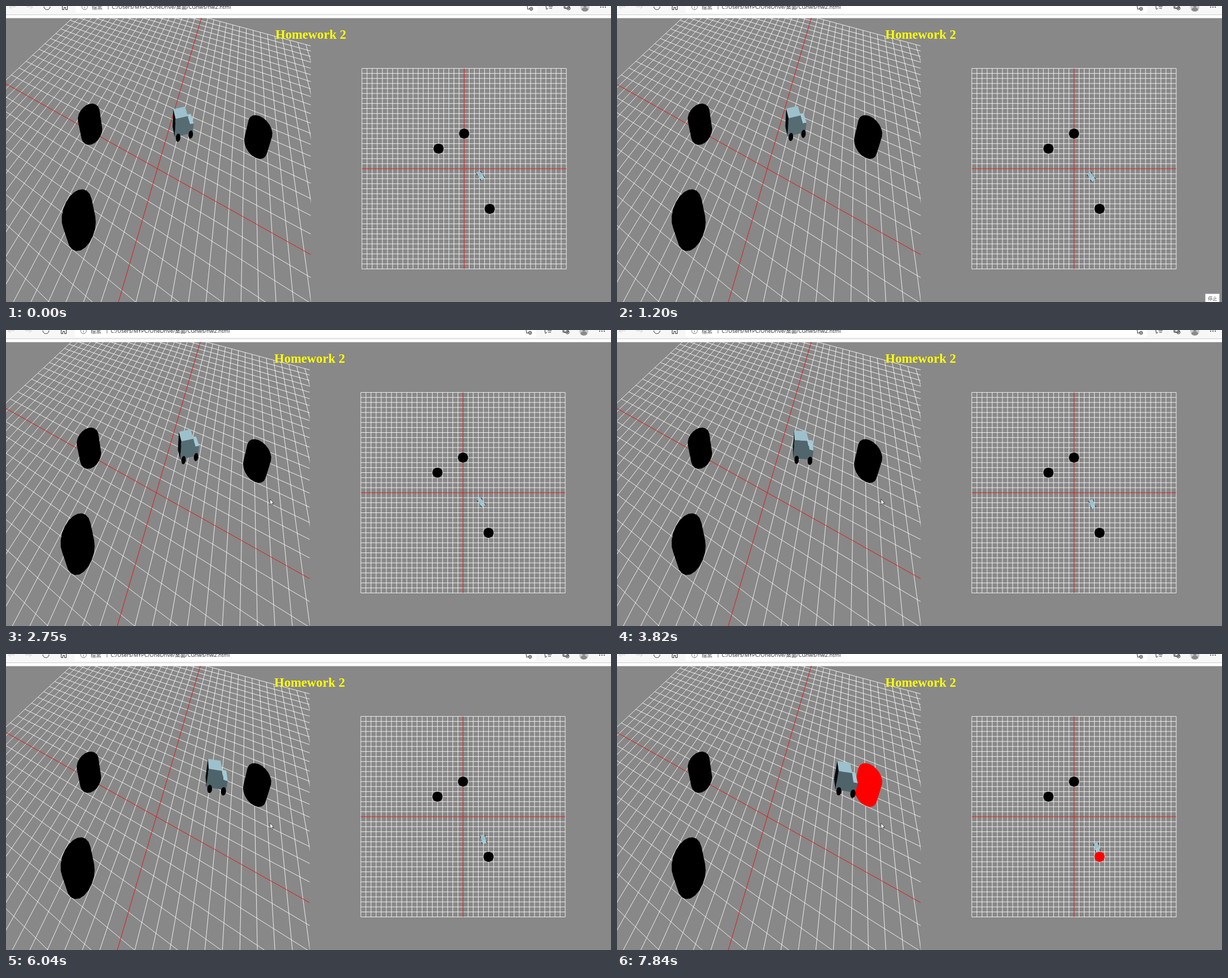
Recreate the animation shown at these times as an HTML page. Size 1069x524 px, loop 7910 ms.

```html
<!DOCTYPE html>
<html lang="zh-Hant">
<head>
<meta charset="utf-8">
<title>Homework 2</title>
<style>
html, body { margin: 0; width: 100%; height: 100%; overflow: hidden; background: #888; }
svg { display: block; width: 1069px; height: 524px; }
.ui { font-family: "Open Sans", "Noto Sans CJK TC", "Noto Sans CJK", sans-serif; }
.title { font: bold 22.6px "Liberation Serif", "Times New Roman", serif; fill: #ff0; text-anchor: middle; }
.icon { fill: none; stroke: #333; stroke-width: 1; }
.grid { fill: none; stroke: #fff; stroke-width: .85; }
.axis { fill: none; stroke: #e01818; stroke-width: 1; }
</style>
</head>
<body>
<svg viewBox="0 0 1069 524">
  <defs>
    <clipPath id="leftView"><rect x="-10" y="21" width="546.5" height="510"/></clipPath>
  </defs>
  <rect width="1069" height="524" fill="#888"/>
  <rect width="1069" height="21.5" fill="#fff"/>
  <rect width="1069" height="15" fill="#f7f7f7"/>
  <rect y="15" width="1069" height="1" fill="#ccc"/>
  <g id="scene">
    <g class="ui">
      <rect x="121" y="-12" width="816" height="24" rx="3" fill="#fff"/>
      <path class="icon" style="stroke:#ccc" d="M4 1.5h11M4 1.5l4 4M34 1.5h11M45 1.5l-4 4"/>
      <path class="icon" d="M65 1a5.5 5.5 0 1 0 11 0M97.500-3v9.500h3V2.500h3v4h3V-3"/>
      <circle class="icon" cx="137" cy="1.500" r="5" style="stroke:#777"/>
      <path class="icon" style="stroke:#777" d="M137 1v3.500M178.500-2v8"/>
      <text x="149.500" y="5.500" font-size="9.500" fill="#666">檔案</text>
      <text x="185" y="5.300" font-size="9.400" fill="#222">C:/Users/MYPC/OneDrive/桌面/CGhws/hw2.html</text>
      <path class="icon" d="M919 0l1 6 4-2M952 0l1 6 3-2M957 1h7M958 4h5M984-1v5h4M986-2h7v6h-7z"/>
      <circle class="icon" cx="926" cy="5" r="2.800"/>
      <circle class="icon" cx="992" cy="4" r="3" fill="#fff"/>
      <path class="icon" d="M924.500 5h3M926 3.500v3M990.500 4h3M992 2.500v3"/>
      <circle cx="1021" cy="2" r="8" fill="#c9c9c9"/>
      <path d="M1015 7a6 4.500 0 0 1 12 0a8 8 0 0 1-12 0" fill="#8a8a8a"/>
      <circle cx="1021" cy="0" r="2.600" fill="#8a8a8a"/>
      <path d="M1048 2h2M1052 2h2M1056 2h2" stroke="#333" stroke-width="1.600"/>
    </g>
    <g clip-path="url(#leftView)">
      <path id="floor" class="grid"/>
      <path id="floorAxis" class="axis"/>
      <g id="pillars"></g>
      <g id="truck"></g>
    </g>
    <path id="map" class="grid"/>
    <path id="mapAxis" class="axis"/>
    <g id="mapTruck"></g>
    <g id="mapPillars"></g>
    <text class="title" x="536.500" y="57.500">Homework 2</text>
    <g id="tooltip" class="ui">
      <rect x="1039.500" y="509.500" width="25" height="17" fill="#fff" stroke="#bbb"/>
      <text x="1044" y="521" font-size="8.200" fill="#555">停止</text>
    </g>
  </g>
  <path id="cursor" d="M466.500 299.500v9.500l2.200-2 1.500 3.300 1.500-.7-1.500-3.200h2.900z" fill="#fff" stroke="#222" stroke-width=".7"/>
  <circle id="busy" cx="473.500" cy="299.500" r="3.500" fill="none" stroke="#1b7fd0" stroke-width="2"/>
</svg>
<script>
const LOOP = 7910;
const HALF = 20;
const $ = id => document.getElementById(id);

// Camera orbiting the floor centre; the picture is squeezed to half width.
const cam = { dist: 14.4, focal: 581, squeeze: 0.5, sinP: 0.694, cosP: 0.72, sinA: 0.375, cosA: 0.927 };
const depthOf = ([x, y, z]) =>
  cam.dist + (cam.cosA * x - cam.sinA * z) * cam.cosP - y * cam.sinP;

function project(p) {
  const [x, y, z] = p;
  const side = cam.sinA * x + cam.cosA * z;
  const away = cam.cosA * x - cam.sinA * z;
  const k = cam.focal / depthOf(p);
  return [265.5 + side * k * cam.squeeze, 288 - (away * cam.sinP + y * cam.cosP) * k];
}
const topDown = ([x, , z]) => [807.5 + x * 9.03, 288 + z * 8.875];

const toPath = (pts, close = true) =>
  "M" + pts.map(p => p.map(v => v.toFixed(2)).join(" ")).join("L") + (close ? "Z" : "");

// Cut the part of a segment that lies behind the camera.
function floorLine(a, b) {
  const near = 0.5;
  const da = depthOf(a), db = depthOf(b);
  const cut = (p, q, dp, dq) => {
    if (dp >= near) return p;
    const k = (near - dp) / (dq - dp);
    return p.map((v, i) => v + (q[i] - v) * k);
  };
  if (da < near && db < near) return "";
  return toPath([project(cut(a, b, da, db)), project(cut(b, a, db, da))], false);
}
const mapLine = (a, b) => toPath([topDown(a), topDown(b)], false);

function lines(draw, axis) {
  let d = "";
  for (let i = -HALF; i <= HALF; i++) {
    if ((i === 0) !== axis) continue;
    d += draw([i, 0, -HALF], [i, 0, HALF]) + draw([-HALF, 0, i], [HALF, 0, i]);
  }
  return d;
}

const area = pts => pts.reduce((sum, p, i) => {
  const q = pts[(i + 1) % pts.length];
  return sum + p[0] * q[1] - q[0] * p[1];
}, 0);

function hull(points) {
  const pts = [...points].sort((a, b) => a[0] - b[0] || a[1] - b[1]);
  const chain = list => {
    const out = [];
    for (const p of list) {
      while (out.length > 1 && area([out[out.length - 2], out[out.length - 1], p]) <= 0) out.pop();
      out.push(p);
    }
    return out.slice(0, -1);
  };
  return [...chain(pts), ...chain(pts.reverse())];
}

const ring = (n, make) => Array.from({ length: n }, (_, i) => {
  const a = i / n * Math.PI * 2;
  return make(Math.cos(a), Math.sin(a));
});

const shape = (d, fill) => `<path d="${d}" fill="${fill}"/>`;

// Truck side profile as [forward, height], from rear bottom over the roof to front bottom.
const profile = [[-0.9, 0.25], [-0.9, 1.3], [0.25, 1.3], [0.52, 0.82], [0.9, 0.8], [0.9, 0.25]];
const faceFill = ["#080c0d", "#9dc1cc", "#a9d2df", "#a3cad6", "#a9d2df"];
const HALF_WIDTH = 0.4;
const wheel = { spots: [-0.58, 0.68], radius: 0.21, inner: 0.4, outer: 0.5 };

// Pose keys: [ms, x, z, heading in degrees].
const poses = [
  [0, 3.2, 1.35, 33], [670, 3.29, 1.48, 33], [1750, 3.43, 1.71, 33], [2750, 3.55, 1.9, 33],
  [4080, 3.57, 2.33, 15], [4750, 3.49, 2.76, 2], [4940, 3.51, 2.98, 4], [5760, 3.92, 4.16, 14],
  [6040, 4, 4.48, 14], [6580, 4.05, 4.69, 14], [7380, 4.16, 5.09, 14], [7840, 4.46, 6.08, 14]
];
function poseAt(t) {
  const i = poses.findIndex(p => p[0] > t);
  if (i < 0) return poses[poses.length - 1].slice(1);
  const a = poses[i - 1], b = poses[i];
  const k = (t - a[0]) / (b[0] - a[0]);
  return [1, 2, 3].map(j => a[j] + (b[j] - a[j]) * k);
}

function drawTruck([x, z, degrees]) {
  const a = degrees * Math.PI / 180;
  const sin = Math.sin(a), cos = Math.cos(a);
  const place = (forward, y, side) =>
    [x + forward * sin - side * cos, y, z + forward * cos + side * sin];

  const { spots, radius, inner, outer } = wheel;
  const wheels = dir => spots.map(f => {
    const pts = [inner, outer].flatMap(s =>
      ring(14, (c, n) => place(f + c * radius, radius + n * radius, s * dir)));
    return shape(toPath(hull(pts.map(project))), "#000");
  }).join("");

  // Faces turned away from the viewer wind the other way on screen.
  const faces = (view, cull) => faceFill.map((fill, i) => {
    const [p, q] = [profile[i], profile[i + 1]];
    const quad = [place(...p, HALF_WIDTH), place(...p, -HALF_WIDTH),
                  place(...q, -HALF_WIDTH), place(...q, HALF_WIDTH)].map(view);
    return cull && area(quad) < 0 ? "" : shape(toPath(quad), fill);
  });

  const g = degrees * 0.36;
  const sideFill = `rgb(${74 + g},${93 + g * 1.25},${100 + g * 1.3})`;
  const side = profile.map(p => project(place(...p, HALF_WIDTH)));
  $("truck").innerHTML = wheels(-1) + faces(project, true).reverse().join("") +
    shape(toPath(side), sideFill) + wheels(1);

  const mapWheels = spots.flatMap(f => [-1, 1].map(dir => {
    const corners = [[-radius, inner], [radius, inner], [radius, outer], [-radius, outer]];
    return shape(toPath(corners.map(([u, s]) => topDown(place(f + u, 0, s * dir)))), "#000");
  })).join("");
  $("mapTruck").innerHTML = mapWheels + faces(topDown, false).slice(1, 4).join("");
}

const pillars = [[0, -7], [-5, -4], [5, 8]];
function buildPillars() {
  const circle = ([x, z], y) => ring(20, (c, s) => [x + c, y, z + s]);
  $("pillars").innerHTML = pillars.map(p =>
    shape(toPath(hull([...circle(p, 0), ...circle(p, 1)].map(project))), "#000")).join("");
  $("mapPillars").innerHTML = pillars.map(p =>
    shape(toPath(circle(p, 1).map(topDown)), "#000")).join("");
}

const show = (id, on) => $(id).setAttribute("visibility", on ? "visible" : "hidden");

function render(t) {
  const shift = t < 400 ? 2 : t < 1200 ? 1 : 0;
  $("scene").setAttribute("transform", `translate(${shift} 0)`);
  drawTruck(poseAt(t));
  const hit = t >= 7650 ? "#f00" : "#000";
  for (const id of ["pillars", "mapPillars"]) $(id).lastElementChild.setAttribute("fill", hit);
  show("tooltip", t >= 400 && t < 2400);
  show("cursor", t >= 2400);
  show("busy", t >= 4300 && t < 5200);
}

$("floor").setAttribute("d", lines(floorLine, false));
$("floorAxis").setAttribute("d", lines(floorLine, true));
$("map").setAttribute("d", lines(mapLine, false));
$("mapAxis").setAttribute("d", lines(mapLine, true));
buildPillars();

const start = performance.now();
function tick() {
  render((performance.now() - start) % LOOP);
  requestAnimationFrame(tick);
}
tick();
</script>
</body>
</html>
```
